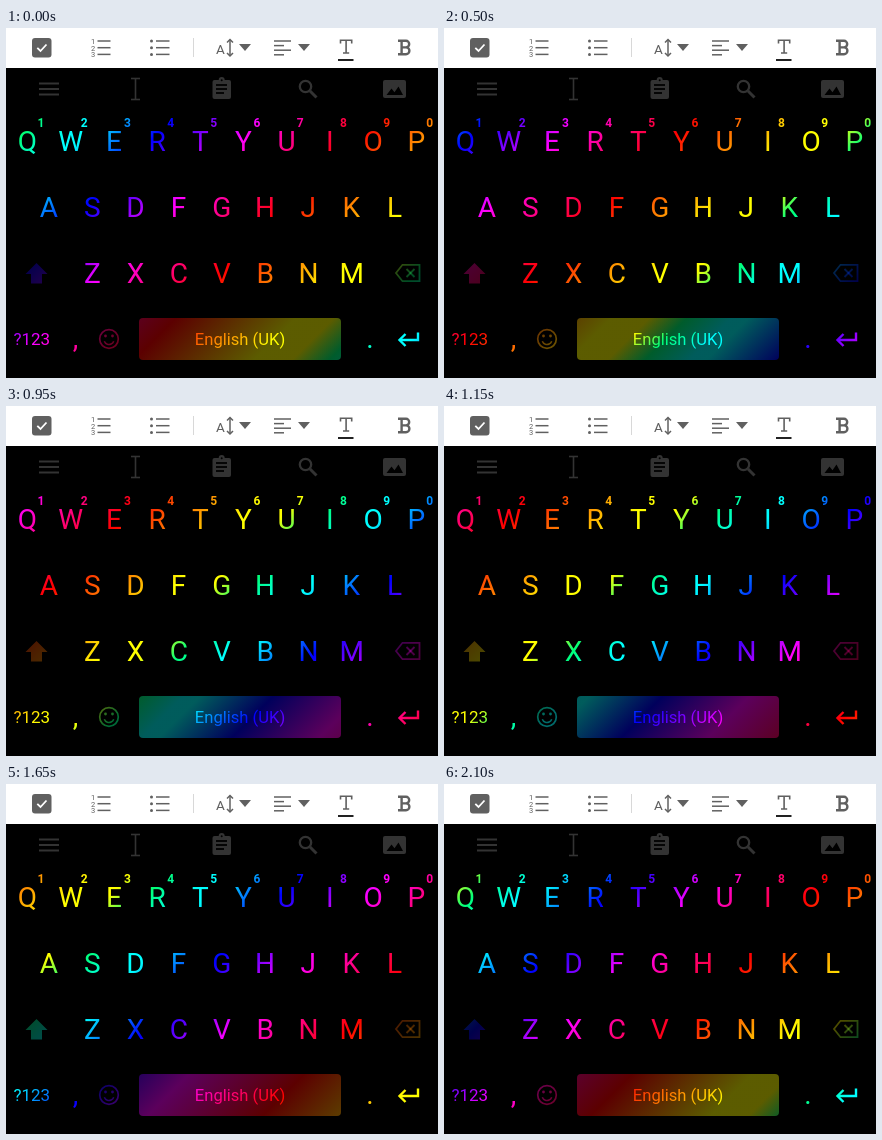
Animation, 432 px wide and 350 px high, one loop 2150 ms. Source, as an HTML page with a canvas:

```html
<!DOCTYPE html>
<html lang="en">
<head>
<meta charset="utf-8">
<title>Rainbow keyboard</title>
<style>
  html, body { margin: 0; width: 100%; height: 100%; overflow: hidden; background: #000; }
  canvas { display: block; }
</style>
</head>
<body>
<canvas id="stage" width="432" height="350"></canvas>
<script>
const ctx = document.getElementById('stage').getContext('2d');
const LOOP = 2150, STEP = 50;
const PERIOD = 532, ORIGIN = 168, REPEATS = 4, TRAVEL = 526;
const FONT = 'Roboto, "Open Sans", sans-serif';
const STOPS = [[0, '#0ff'], [17, '#0ff'], [90, '#00f'], [177, '#f0f'], [292, '#f00'],
  [412, '#ff0'], [450, '#ff0'], [487, '#00ff78'], [532, '#0ff']];

function paint(color, alpha = 1) {
  ctx.fillStyle = ctx.strokeStyle = color;
  ctx.globalAlpha = alpha;
}

function text(str, x, y, size, weight = 400) {
  ctx.font = `${weight} ${size}px ${FONT}`;
  ctx.textAlign = 'center';
  ctx.fillText(str, x, y);
}

function trace(points, closed) {
  ctx.beginPath();
  for (let i = 0; i < points.length; i += 2) ctx.lineTo(points[i], points[i + 1]);
  if (closed) ctx.closePath();
}

function line(width, ...points) {
  trace(points);
  ctx.lineWidth = width;
  ctx.stroke();
}

function shape(...points) {
  trace(points, true);
  ctx.fill();
}

function outline(width, path) {
  ctx.lineWidth = width;
  ctx.stroke(new Path2D(path));
}

function disc(x, y, r) {
  ctx.beginPath();
  ctx.arc(x, y, r, 0, 7);
  ctx.fill();
}

function box(x, y, w, h, r) {
  ctx.beginPath();
  ctx.roundRect(x, y, w, h, r);
  ctx.fill();
}

function ring(x, y, r, width, from = 0, to = 2 * Math.PI) {
  ctx.beginPath();
  ctx.arc(x, y, r, from, to);
  ctx.lineWidth = width;
  ctx.stroke();
}

function drawToolbar() {
  paint('#fff');
  ctx.fillRect(0, 0, 432, 40);
  paint('#606060');
  box(26, 10, 19.5, 19.5, 3);
  for (let i = 0; i < 3; i++) {
    const y = 13 + i * 6.7;
    text(i + 1, 87, y + 2.8, 7.5);
    line(1.5, 91.5, y, 104.5, y);
    disc(145.5, y, 1.5);
    line(1.5, 150, y, 163.5, y);
  }
  text('A', 214.5, 26, 13.5);
  line(1.5, 224, 12, 224, 27.5);
  line(1.5, 221, 14.5, 224, 11.5, 227, 14.5);
  line(1.5, 221, 25, 224, 28, 227, 25);
  shape(233, 16, 245, 16, 239, 23);
  [13, 17.6, 22.2, 26.8].forEach((y, i) => line(1.5, 268, y, i % 2 ? 278 : 285, y));
  shape(292, 16, 304, 16, 298, 23);
  outline(1.6, 'M334.5 15.5V12.2H345.7V15.5M340.1 12.2V25M337 25H343.2');
  outline(2.4, 'M392 12.8H400a3.2 3.3 0 0 1 0 6.6H395.6M400 19.4a3.4 3.4 0 0 1 0 6.8H392M395.6 12.8V26.2');
  paint('#222');
  ctx.fillRect(332, 31, 15.5, 2);
  paint('#fff');
  line(1.8, 31.3, 19.8, 34.5, 23, 40.5, 16.5);
  paint('#d8d8d8');
  ctx.fillRect(187, 10, 1, 19);
}

function drawTools() {
  paint('#333');
  for (const y of [55.5, 61, 66.5]) line(2, 33, y, 53, y);
  line(1.6, 129.5, 51, 129.5, 71);
  line(1.6, 125, 50.5, 134, 50.5);
  line(1.6, 125, 71.5, 134, 71.5);
  box(206.5, 52, 18.5, 19, 2);
  disc(215.7, 52, 3);
  ring(299.5, 58.5, 5.7, 2.3);
  line(3, 303.8, 62.8, 310.5, 69.5);
  box(377, 52, 23, 18, 2);
  paint('#000');
  for (const [y, x] of [[57, 221], [61, 221], [65, 218]]) line(1.8, 210, y, x, y);
  disc(215.7, 52.2, 1);
  shape(380.5, 67, 385.5, 60.5, 388.5, 64.2, 392.5, 58.5, 397, 67);
}

// Colour depends on x + y and slides toward the top left.
function rainbow(phase) {
  const span = PERIOD * REPEATS;
  const start = (ORIGIN - phase - PERIOD) / 2;
  const end = start + span / 2;
  const grad = ctx.createLinearGradient(start, start, end, end);
  for (let k = 0; k < REPEATS; k++)
    for (const [pos, color] of STOPS) grad.addColorStop((k * PERIOD + pos) / span, color);
  return grad;
}

function drawKeys(grad) {
  paint(grad);
  [['QWERTYUIOP', 21.5, 123], ['ASDFGHJKL', 43, 189], ['ZXCVBNM', 86.4, 255]]
    .forEach(([keys, x, y]) => [...keys].forEach((key, i) => text(key, x + i * 43.2, y, 28)));
  [...'1234567890'].forEach((n, i) => text(n, 35 + i * 43.2, 99, 12, 700));
  text('?123', 25.8, 317, 17);
  text(',', 69.5, 320, 28);
  text('.', 364, 320, 28);
  line(2.4, 412, 304.5, 412, 312, 395, 312);
  line(2.4, 399.5, 306, 393.5, 312, 399.5, 318);

  paint(grad, 0.36);
  box(133, 290, 202, 42, 4);
  paint(grad);
  text('English (UK)', 234, 316.5, 16.6);

  paint(grad, 0.3);
  shape(30.5, 235, 41.5, 246, 36, 246, 36, 255.5, 25, 255.5, 25, 246, 19.5, 246);
  outline(1.8, 'M390 245L396.5 236.8H413.5V253.2H396.5Z');
  line(1.8, 400.5, 241, 408.5, 249);
  line(1.8, 408.5, 241, 400.5, 249);

  paint(grad, 0.42);
  ring(103, 311, 9.3, 1.7);
  disc(99.5, 308, 1.4);
  disc(106.5, 308, 1.4);
  ring(103, 311.5, 5, 1.5, 0.35, Math.PI - 0.35);
}

const begin = performance.now();

function frame() {
  const time = (performance.now() - begin) % LOOP;
  const phase = Math.floor(time / STEP) * STEP / LOOP * TRAVEL;
  paint('#000');
  ctx.fillRect(0, 0, 432, 350);
  drawToolbar();
  drawTools();
  drawKeys(rainbow(phase));
  requestAnimationFrame(frame);
}
frame();
</script>
</body>
</html>
```
